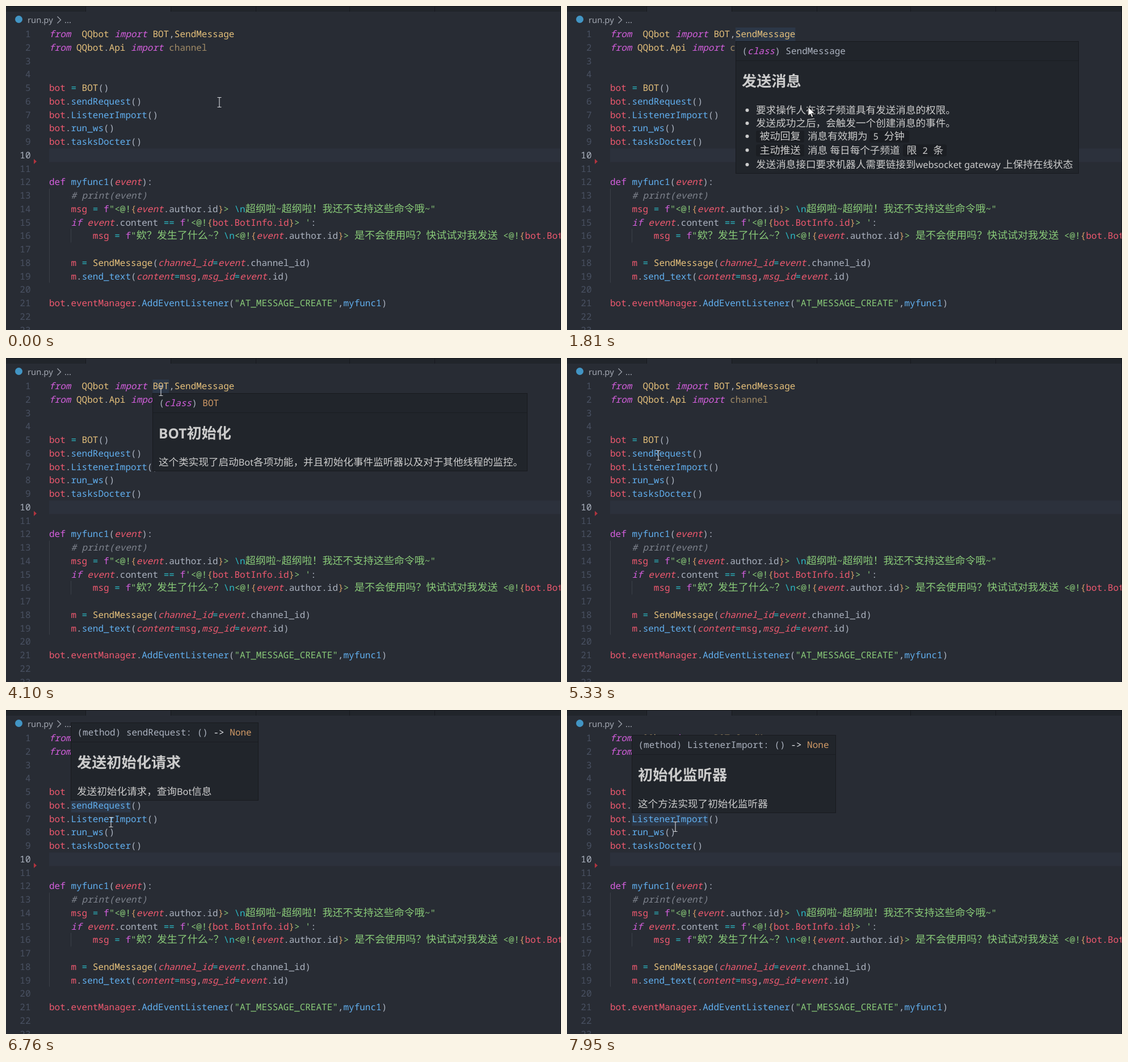
These frames come from a looping animation (978 px wide and 572 px high, 8 s). An HTML page:

```html
<!DOCTYPE html>
<html lang="zh-CN">
<head>
<meta charset="utf-8">
<style>
  html, body { margin: 0; width: 100%; height: 100%; overflow: hidden; background: #282c34; }
  svg { display: block; position: absolute; left: 0; top: 0; }
  text { white-space: pre; text-rendering: geometricPrecision; fill: #abb2bf; }
  .code { font: 16px "Noto Sans Mono", monospace; font-variant-ligatures: none; }
  .prose { font: 16.3px "Noto Sans", sans-serif; fill: #ccc; }
  .title { font: bold 24.5px "Noto Sans", sans-serif; fill: #ccc; }
  .crumb { font: 14.8px "Noto Sans", sans-serif; fill: #a0a5af; }
  .cjk { font-family: "Noto Sans CJK SC", "Noto Sans CJK", sans-serif; }
  .code .cjk { font-size: 18.05px; }
  .prose .cjk { font-size: 17.6px; }
  .title .cjk { font-size: 26.2px; }
</style>
</head>
<body>
<svg id="stage" width="978" height="572" viewBox="0 0 978 572"></svg>
<script>
const stage = document.getElementById('stage');
const COL = 9.6, ROW = 23.75, LEFT = 76, BASE = 55;
const COLORS = {
  w: '#abb2bf', p: '#d55fde', y: '#e5c07b', r: '#ef596f', b: '#61afef', g: '#89ca78',
  c: '#2bbac5', o: '#d19a66', m: '#7f848e', d: '#a18b66', h: '#e6e8ec'
};

// "§x" switches colour; an upper-case letter also means italic.
const LINES = [
  '§Pfrom§y  QQbot §Pimport §yBOT§w,§ySendMessage',
  '§Pfrom §yQQbot§w.§yApi §Pimport §dchannel',
  '', '',
  '§rbot §c= §yBOT§w()',
  '§rbot§w.§bsendRequest§w()',
  '§rbot§w.§bListenerImport§w()',
  '§rbot§w.§brun_ws§w()',
  '§rbot§w.§btasksDocter§w()',
  '', '',
  '§pdef §bmyfunc1§w(§Revent§w):',
  '    §M# print(event)',
  '    §rmsg §c= §pf§g"<@!§o{§Revent§w.author.id§o}§g> §c\\n§g超纲啦~超纲啦！我还不支持这些命令哦~"',
  '    §Pif §Revent§w.content §c== §pf§g\'<@!§o{§rbot.BotInfo.id§o}§g> \'§w:',
  '        §rmsg §c= §pf§g"欸？发生了什么~？§c\\n§g<@!§o{§Revent§w.author.id§o}§g> 是不会使用吗？快试试对我发送 <@!§o{§rbot.BotInfo',
  '',
  '    §rm §c= §ySendMessage§w(§Rchannel_id§c=§Revent§w.channel_id)',
  '    §rm§w.§bsend_text§w(§Rcontent§c=§rmsg§w,§Rmsg_id§c=§Revent§w.id)',
  '',
  '§rbot§w.§reventManager§w.§bAddEventListener§w(§g"AT_MESSAGE_CREATE"§w,§bmyfunc1§w)',
  '', ''
];

function add(parent, tag, attrs = {}, content) {
  const node = document.createElementNS('http://www.w3.org/2000/svg', tag);
  for (const key in attrs) node.setAttribute(key, attrs[key]);
  if (content !== undefined) node.textContent = content;
  parent.append(node);
  return node;
}
const rect = (parent, x, y, width, height, fill, extra) =>
  add(parent, 'rect', { x, y, width, height, fill, ...extra });

function write(parent, x, y, style, source, anchor = 'start') {
  const text = add(parent, 'text', { x, y, class: style, 'text-anchor': anchor });
  source.split('§').forEach((run, i) => {
    const key = i ? run[0] : '';
    for (const part of (i ? run.slice(1) : run).match(/[\u3000-\uffef]+|[^\u3000-\uffef]+/g) || []) {
      const span = add(text, 'tspan', part[0] >= '\u3000' ? { class: 'cjk' } : {}, part);
      if (key) span.style.fill = COLORS[key.toLowerCase()];
      if (key && key < 'a') span.style.fontStyle = 'italic';
    }
  });
  return text;
}

function drawEditor() {
  rect(stage, 0, 0, 978, 572, '#282c34');
  rect(stage, 0, 0, 978, 10, '#21252b');
  rect(stage, 141, 0, 149, 10, '#282c34');
  for (const x of [140, 290, 440, 605, 755]) rect(stage, x, 0, 1, 10, '#181a1f');
  rect(stage, 0, 0, 978, 1, '#15171b');
  add(stage, 'circle', { cx: 22.5, cy: 23.5, r: 6.5, fill: '#4295c4' });
  write(stage, 38, 30, 'crumb', 'run.py');
  add(stage, 'path', { d: 'M90.5 18.5l6 6-6 6', fill: 'none', stroke: '#a0a5af', 'stroke-width': 1.3 });
  write(stage, 103, 30, 'crumb', '...');

  rect(stage, LEFT, 251.5, 902, 24, '#2c313c');
  rect(stage, 76, 322.5, 1, 166, '#3b4048');
  rect(stage, 114, 393.5, 1, 24, '#3b4048');
  add(stage, 'path', { d: 'M49 270l5 4.5-5 4.5z', fill: '#b0343f' });
}

function drawCode() {
  LINES.forEach((line, i) => {
    const y = BASE + i * ROW;
    const number = write(stage, 43.5, y, 'code', String(i + 1), 'end');
    number.style.fill = i === 9 ? '#abb2bf' : '#495162';
    write(stage, LEFT, y, 'code', line);
  });
}

function chip(parent, x, y, width, label) {
  rect(parent, x, y - 16, width, 21, '#1b1e23', { rx: 3 });
  write(parent, x + 6.5, y, 'code', label).style.fill = '#ccc';
}

function sendBody(g) {
  const rows = [190, 213, 236, 260.5, 286];
  rows.forEach(y => add(g, 'circle', { cx: 317.5, cy: y - 6, r: 3, fill: '#ccc' }));
  write(g, 333, rows[0], 'prose', '要求操作人在该子频道具有发送消息的权限。');
  write(g, 333, rows[1], 'prose', '发送成功之后，会触发一个创建消息的事件。');
  chip(g, 333, rows[2], 85, '被动回复');
  write(g, 424, rows[2], 'prose', '消息有效期为');
  chip(g, 533, rows[2], 70, '5 分钟');
  chip(g, 333, rows[3], 85, '主动推送');
  write(g, 424, rows[3], 'prose', '消息 每日每个子频道');
  chip(g, 592, rows[3], 77, '限 2 条');
  write(g, 333, rows[4], 'prose', '发送消息接口要求机器人需要链接到websocket gateway 上保持在线状态');
}

// Each hover card also marks the word it belongs to.
const HOVERS = [
  { show: 710, hide: 2350, x: 297, y: 62, w: 605, h: 234, row: 0, col: 23, len: 11,
    head: '(§Pclass§w) SendMessage', title: '发送消息', body: sendBody },
  { show: 3760, hide: 4930, x: 258, y: 62, w: 661, h: 138, row: 0, col: 19, len: 3,
    head: '(§Pclass§w) §oBOT', title: 'BOT初始化',
    body: '这个类实现了启动Bot各项功能，并且初始化事件监听器以及对于其他线程的监控。' },
  { show: 5620, hide: 6850, x: 114, y: 22, w: 331, h: 138, row: 5, col: 4, len: 11,
    head: '(method) sendRequest: () §h->§o None', title: '发送初始化请求',
    body: '发送初始化请求，查询Bot信息' },
  { show: 7140, hide: 8000, x: 114, y: 44, w: 360, h: 138, row: 6, col: 4, len: 14,
    head: '(method) ListenerImport: () §h->§o None', title: '初始化监听器',
    body: '这个方法实现了初始化监听器' }
];

function drawMark(hover) {
  hover.mark = rect(stage, LEFT + hover.col * COL, 38 + hover.row * ROW, hover.len * COL, 24, '#2c3747');
}

function drawCard(hover) {
  const { x, y, w, h, head, title, body } = hover;
  const g = hover.card = add(stage, 'g');
  rect(g, x + .5, y + .5, w - 1, h - 1, '#21252b', { stroke: '#181a1f' });
  rect(g, x + 1, y + 34, w - 2, 1, '#1a1d22');
  write(g, x + 11.5, y + 23, 'code', head);
  write(g, x + 11, y + 80, 'title', title);
  if (typeof body === 'string') write(g, x + 11, y + 128, 'prose', body);
  else body(g);
}

drawEditor();
HOVERS.forEach(drawMark);
drawCode();
HOVERS.forEach(drawCard);
rect(stage, 977, 0, 1, 572, '#15171b');

const beam = add(stage, 'path', {
  d: 'M-3.5 -8.5h3l.5 .5 .5-.5h3M0 -8v16M-3.5 8.5h3l.5-.5 .5 .5h3',
  fill: 'none', stroke: '#d8dade', 'stroke-width': 1.1
});
const arrow = add(stage, 'path', {
  d: 'M0 0v16l3.7-3.4 2.5 5.7 2.6-1.1-2.5-5.6h5z', fill: '#fff', stroke: '#111', 'stroke-width': 1
});

// Pointer stops: time, x, y
const PATH = [
  [0, 376, 170], [50, 376, 170], [520, 345, 54], [1380, 345, 54], [1810, 425, 178], [2140, 400, 186],
  [2670, 198, 194], [2950, 170, 190], [3000, 170, 189], [3620, 273, 58], [4570, 273, 58],
  [5330, 161, 172], [6140, 161, 172], [6760, 185, 198], [6950, 186, 194], [7670, 186, 194],
  [7710, 186, 200], [7940, 186, 200], [7950, 191, 206], [8000, 191, 206]
];

function pointerAt(t) {
  const i = PATH.findIndex(stop => stop[0] > t);
  const [t0, x0, y0] = PATH[i - 1], [t1, x1, y1] = PATH[i];
  const u = (t - t0) / (t1 - t0), k = u * u * (3 - 2 * u);
  return [x0 + (x1 - x0) * k, y0 + (y1 - y0) * k];
}

function render(now) {
  const t = now % 8000;
  const [px, py] = pointerAt(t);
  let overCard = false;
  for (const { show, hide, x, y, w, h, mark, card } of HOVERS) {
    const alpha = t >= show && t < hide ? Math.min(1, (t - show + 30) / 130) : 0;
    mark.style.opacity = card.style.opacity = alpha;
    if (alpha && px > x && px < x + w && py > y && py < y + h) overCard = true;
  }
  const place = `translate(${Math.round(px)} ${Math.round(py)})`;
  for (const [shape, shown] of [[beam, !overCard], [arrow, overCard]]) {
    shape.setAttribute('transform', place);
    shape.style.display = shown ? '' : 'none';
  }
}

const start = performance.now();
function tick() {
  render(performance.now() - start);
  requestAnimationFrame(tick);
}
tick();
</script>
</body>
</html>
```
